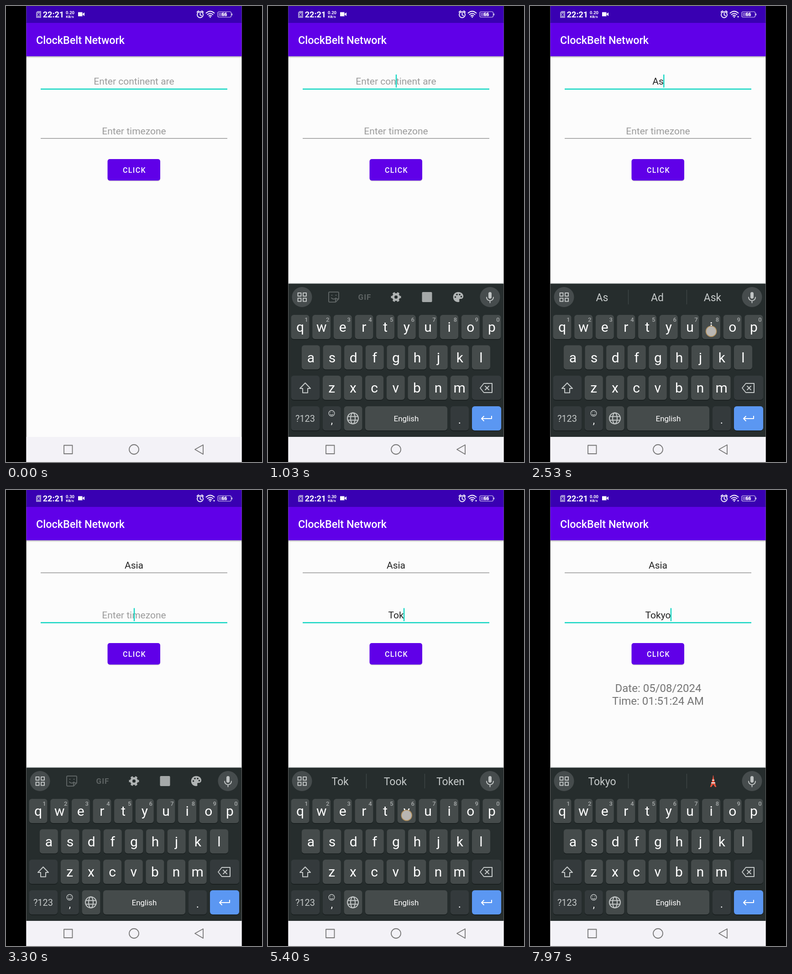
These frames come from a looping animation (561x998 px, 8000 ms). An HTML page:

```html
<!DOCTYPE html>
<html lang="en">
<head>
<meta charset="utf-8">
<title>Time lookup</title>
<style>
html, body { margin: 0; width: 100%; height: 100%; overflow: hidden; background: #000; }
svg { display: block; width: 100%; height: 100%; font-family: Roboto, "Noto Sans", sans-serif; }
text { text-anchor: middle; white-space: pre; }
.line { fill: none; stroke-linecap: round; stroke-linejoin: round; }
</style>
</head>
<body>
<svg viewBox="0 0 561 998" preserveAspectRatio="none">
  <defs>
    <clipPath id="kbClip"><rect x="44.5" y="600" width="472" height="343"/></clipPath>
    <linearGradient id="shade" x2="0" y2="1">
      <stop stop-color="#000" stop-opacity=".28"/><stop offset="1" stop-color="#000" stop-opacity="0"/>
    </linearGradient>
  </defs>
  <rect width="561" height="998"/>
  <rect x="44.5" width="472" height="998" fill="#fcfcfc"/>
  <rect x="44.5" y="110" width="472" height="4" fill="url(#shade)"/>
  <rect x="44.5" y="36" width="472" height="74" fill="#6000e8"/>
  <rect x="44.5" width="472" height="37" fill="#3900b2"/>

  <g id="status" fill="#fff" font-weight="700">
    <path d="M69 11h8v15H66V14z" fill="#a08fd6"/>
    <path d="M69 16l5 6m0-6l-5 6" stroke="#3900b2" stroke-width="1.5"/>
    <text x="104" y="25" font-size="18">22:21</text>
    <text id="speed" x="140.5" y="17.5" font-size="9.5"></text>
    <text x="140" y="25.5" font-size="8">KB/s</text>
    <path d="M158 13.5h9.500v9H158zM168 17l4-3v8l-4-3z"/>
    <g class="line" stroke="#fff" stroke-width="1.8">
      <circle cx="425.500" cy="19" r="6.500"/>
      <path d="M425.500 15v4.500l3 2M418.500 13.500l3.500-3M432.500 13.500l-3.500-3"/>
      <path d="M438.500 15.500q9-8 18 0M441.500 18.700q6-5 12 0M444.500 21.700q3-2.500 6 0"/>
      <rect x="464" y="12.500" width="29.500" height="12" rx="3" stroke="#d5caf0" stroke-width="1.2"/>
    </g>
    <circle cx="447.500" cy="24" r="1.500"/>
    <circle id="traffic" cx="456" cy="23.500" r="1.600"/>
    <rect x="466" y="14.500" width="18" height="8" rx="1" opacity=".35"/>
    <rect x="494.500" y="16.500" width="1.500" height="4"/>
    <text x="478.500" y="22.300" font-size="10.500">66</text>
  </g>

  <text x="66" y="82.500" font-size="23.400" font-weight="500" fill="#fff" style="text-anchor:start">ClockBelt Network</text>

  <rect id="line0" x="76" width="409"/>
  <rect id="line1" x="76" width="409"/>
  <text id="field0" x="280.500" y="172" font-size="21"></text>
  <text id="field1" x="280.500" y="280.500" font-size="21"></text>
  <rect id="caret" width="2.400" height="28.500" fill="#12d6c3"/>

  <rect x="223" y="337" width="115" height="46.500" rx="5" fill="#000" opacity=".18"/>
  <rect x="222.500" y="335" width="115.500" height="47" rx="5" fill="#6000e8"/>
  <rect id="ripple" x="222.500" y="335" width="115.500" height="47" rx="5" fill="#9653f0"/>
  <text x="281.500" y="365" font-size="16" font-weight="500" letter-spacing="1.400" fill="#fff">CLICK</text>

  <path id="spinner" fill="none" stroke="#0fd8c4" stroke-width="4.600"/>
  <g id="result" font-size="24" fill="#757575">
    <text x="281" y="442">Date: 05/08/2024</text>
    <text x="280.500" y="469.500">Time: 01:51:24 AM</text>
  </g>

  <g clip-path="url(#kbClip)"><g id="keyboard">
    <rect x="44.500" y="606.500" width="472" height="2" fill="#a9aeae"/>
    <rect x="44.500" y="608" width="472" height="336" fill="#262d2d"/>
    <circle cx="74.500" cy="637" r="22" fill="#464c4d"/>
    <circle cx="486.500" cy="637" r="22" fill="#464c4d"/>
    <g class="line" stroke="#c0c4c4" stroke-width="2">
      <path d="M65.500 628h7v7h-7zM77 628h7v7h-7zM65.500 639.500h7v7h-7zM77 639.500h7v7h-7z"/>
      <path d="M479 637.500a7.500 7.500 0 0 0 15 0M486.500 645.500v4"/>
      <path d="M486.500 629.500v7.500" stroke-width="7"/>
    </g>
    <g id="tools">
      <g class="line" stroke="#5d6363" stroke-width="2">
        <path d="M135 626h18q2 0 2 2v13l-7 7h-13q-2 0-2-2v-18q0-2 2-2zM155 641h-7v7M139 639q5 5 10 0M139.500 633h1M148.500 633h1" />
      </g>
      <text x="212" y="643" font-size="17" font-weight="700" letter-spacing="1" fill="#5d6363">GIF</text>
      <g fill="none" stroke="#b0b4b4">
        <circle cx="280.500" cy="637" r="6" stroke-width="5"/>
        <circle cx="280.500" cy="637" r="9" stroke-width="4" pathLength="12" stroke-dasharray="1 1" stroke-dashoffset=".5"/>
      </g>
      <rect x="337.500" y="626" width="22" height="22" rx="2" fill="#a5a9a9"/>
      <path d="M417 626c-15 0-15 22 0 22c4 0 2-4 2-5c0-2 2-2 4-2c8 0 7-15-6-15z" fill="#b0b4b4"/>
      <g fill="#262d2d"><circle cx="410.500" cy="637" r="1.800"/><circle cx="414" cy="631.500" r="1.800"/><circle cx="420" cy="631.500" r="1.800"/><circle cx="423.500" cy="636" r="1.800"/></g>
    </g>
    <g id="strip" font-size="23" fill="#c6caca">
      <path d="M215.500 621v32M343.500 621v32" stroke="#424848" stroke-width="1.200"/>
      <text id="word0" x="158" y="646"></text>
      <text id="word1" x="279" y="646"></text>
      <text id="word2" x="400" y="646"></text>
      <g id="tower">
        <path d="M401.500 625v5" stroke="#e8553f" stroke-width="1.500"/>
        <path d="M400.500 629h2l2 10 4 11h-3l-4-6-4 6h-3l4-11z" fill="#e8553f"/>
        <path d="M399 635h5M397 641h9" stroke="#f2eeee" stroke-width="2.200"/>
      </g>
    </g>
    <g id="keys"></g>
    <path id="shift" class="line" d="M81.500 825L93 837H87V846.500H76V837H70Z" stroke="#c4c8c8" stroke-width="2"/>
    <g class="line" stroke="#c4c8c8" stroke-width="2">
      <path d="M473 826h18v20h-18l-8-10zM476 832l8 8m0-8l-8 8"/>
      <circle cx="139.500" cy="891.500" r="6.300" stroke-width="1.400"/>
      <path d="M136.500 893.500q3 3.500 6 0M137 889.500h.2M142 889.500h.2" stroke-width="1.400"/>
      <circle cx="186" cy="902.500" r="12"/>
      <ellipse cx="186" cy="902.500" rx="5" ry="12"/>
      <path d="M175 898.500h22M175 906.500h22"/>
      <path d="M490 897v6h-22m5.500-5.500l-5.500 5.500 5.500 5.500" stroke="#fff" stroke-linecap="butt"/>
    </g>
    <g fill="#fff">
      <text x="81.500" y="909.500" font-size="20" fill="#c4c8c8">?123</text>
      <text x="140" y="914" font-size="22">,</text>
      <text x="303" y="908.500" font-size="17">English</text>
      <text x="420" y="914" font-size="24">.</text>
    </g>
  </g></g>

  <rect x="44.500" y="943" width="472" height="55" fill="#f3f2f7"/>
  <g class="line" stroke="#777" stroke-width="1.800">
    <rect x="127" y="961.500" width="18.500" height="18.500"/>
    <circle cx="280.500" cy="970.500" r="10.500"/>
    <path d="M414 970.500L432 960.500V981Z"/>
  </g>
  <circle id="touch" r="11.500" fill="#b9b6b2" stroke="#b3905a" stroke-width="1.600"/>
</svg>
<script>
const LOOP = 8000;
const $ = id => document.getElementById(id);
const set = (id, attrs) => { for (const k in attrs) $(id).setAttribute(k, attrs[k]); };
const label = (id, s) => { if ($(id).textContent !== s) $(id).textContent = s; };
const ramp = (t, a, b) => Math.min(1, Math.max(0, (t - a) / (b - a)));
const latest = (table, t) => table.filter(row => row[0] <= t).pop();

// Keyboard
const PITCH = 46.65;
const ROWS = [['qwertyuiop', 50.5, 676], ['asdfghjkl', 73.8, 742.5], ['zxcvbnm', 119.8, 809]];
const key = (x, y, w, fill) =>
  `<rect x="${x}" y="${y + 1.5}" width="${w}" height="53" rx="6" fill="#171d1d"/>` +
  `<rect x="${x}" y="${y}" width="${w}" height="53" rx="6" fill="${fill}"/>`;
const PLAIN = '#454b4b', DARK = '#343a3c';
let markup = key(50.5, 809, 62.5, DARK) + key(447, 809, 64, DARK) + key(50.5, 876, 62.5, DARK) +
  key(119.8, 876, 40, DARK) + key(166.5, 876, 40, PLAIN) + key(213, 876, 180, PLAIN) +
  key(400, 876, 40, DARK) + key(447, 876, 64, '#5b97f2');
const keyAt = {};
ROWS.forEach(([letters, left, top], row) => [...letters].forEach((c, i) => {
  const x = left + i * PITCH, mid = x + 20;
  keyAt[c] = [mid, top + 36];
  markup += key(x, top, 40, PLAIN) +
    `<text class="letter" data-c="${c}" x="${mid}" y="${top + 37}" font-size="30" fill="#fff">${c}</text>`;
  if (!row) markup += `<text x="${mid + 13.5}" y="${top + 14.5}" font-size="13" font-weight="500" fill="#a4a8a8">${(i + 1) % 10}</text>`;
}));
$('keys').innerHTML = markup;
const letters = [...document.querySelectorAll('.letter')];

// Typing: time, field, text, three suggestions
const TYPED = [
  [0, 0, ''],
  [2000, 0, 'A', 'A', 'I', 'And'], [2300, 0, 'As', 'As', 'Ad', 'Ask'],
  [2560, 0, 'Asi', 'Asi', 'Asia', 'Aside'], [2800, 0, 'Asia', 'Asia', 'Asian', 'Asia\u2019s'],
  [3070, 1, ''],
  [4500, 1, 'T', 'T', 'Y', 'The'], [4780, 1, 'To', 'To', 'Top', 'Too'],
  [5080, 1, 'Tok', 'Tok', 'Took', 'Token'], [5420, 1, 'Toky', 'Toky', 'Tokyo', 'Today'],
  [5800, 1, 'Tokyo', 'Tokyo', '', '']
];
const HINTS = ['Enter continent are', 'Enter timezone'];
const SPEED = [[0, '0.20'], [2620, '0.30'], [5600, '0.00']];
const CAPS = [[0, false], [1600, true], [2000, false], [4120, true], [4500, false]];

// Touches: down, up, x, y
const TOUCHES = [
  [50, 160, 282, 166], [1510, 1600, 82, 838], [2990, 3070, 284, 275],
  [4020, 4120, 82, 838], [6100, 6190, 282, 361],
  ...TYPED.filter(r => r[2]).map(([t, , text]) => {
    const [x, y] = text === 'T' ? [270, 722] : keyAt[text.slice(-1).toLowerCase()];
    return [t - 80, t + 70, x, y];
  })
].sort((a, b) => a[0] - b[0]);

// Fast-out, slow-in curve (.4, 0, .2, 1)
function ease(p) {
  let lo = 0, hi = 1;
  for (let i = 0; i < 20; i++) {
    const s = (lo + hi) / 2, x = 1.2 * s * (1 - s) ** 2 + .6 * s * s * (1 - s) + s ** 3;
    if (x < p) lo = s; else hi = s;
  }
  return 3 * lo * lo - 2 * lo ** 3;
}

function drawSpinner(t) {
  const on = t >= 6190 && t < 7500;
  set('spinner', { visibility: on ? 'visible' : 'hidden' });
  if (!on) return;
  const age = t - 6190, u = age % 1333 / 1333;
  const turn = age / 4444 * 720 + u * 90 - 106;
  const from = turn + 270 * ease(ramp(u, .5, 1)), to = turn + 270 * ease(ramp(u, 0, .5)) + 2;
  const at = deg => {
    const a = deg * Math.PI / 180;
    return `${281 + 23.5 * Math.cos(a)} ${507 + 23.5 * Math.sin(a)}`;
  };
  set('spinner', { d: `M${at(from)}A23.5 23.5 0 ${to - from > 180 ? 1 : 0} 1 ${at(to)}` });
}

function drawFields(t) {
  const [since, focus, text, ...words] = latest(TYPED, t);
  const values = focus ? ['Asia', text] : [text, ''];
  values.forEach((value, i) => {
    label('field' + i, value || HINTS[i]);
    set('field' + i, { fill: value ? '#222' : '#9b9b9b' });
    const active = i === focus;
    set('line' + i, { y: 180.6 + i * 108.5, height: active ? 2.5 : 1.3, fill: active ? '#12d6c3' : '#858585' });
  });
  const base = since || 970;
  const on = t >= base && Math.floor((t - base) / 500) % 2 === 0;
  const half = text ? $('field' + focus).getComputedTextLength() / 2 : 0;
  set('caret', { x: 279.8 + half, y: 150 + focus * 108.5, visibility: on ? 'visible' : 'hidden' });

  const typing = words.length > 0;
  const fade = since === 3070 ? ramp(t, 3100, 3280) : 1;
  set('tools', { opacity: typing ? 0 : fade });
  set('strip', { opacity: typing ? 1 : 0 });
  for (let i = 0; i < 3; i++) label('word' + i, words[i] || '');
  set('tower', { opacity: text === 'Tokyo' ? 1 : 0 });
}

function draw(t) {
  drawFields(t);
  drawSpinner(t);
  label('speed', latest(SPEED, t)[1]);
  set('traffic', { opacity: t > 1500 ? 1 : 0 });
  set('result', { opacity: t >= 7500 ? 1 : 0 });
  set('ripple', { opacity: ramp(t, 6100, 6220) * (1 - ramp(t, 6450, 6700)) });
  set('keyboard', { transform: `translate(0 ${340 * (1 - ease(ramp(t, 380, 720)))})` });

  const caps = latest(CAPS, t)[1];
  letters.forEach(el => {
    const c = caps ? el.dataset.c.toUpperCase() : el.dataset.c;
    if (el.textContent !== c) {
      el.textContent = c;
      el.setAttribute('transform', `translate(0 ${caps ? 1.5 : 0})`);
    }
  });
  $('shift').style.fill = caps ? '#c4c8c8' : 'none';

  const [down, up, x, y] = latest(TOUCHES, t) || [0, 0, 0, 0];
  set('touch', { cx: x, cy: y, opacity: up ? ramp(t, down - 1, down + 30) * (1 - ramp(t, up, up + 70)) : 0 });
}

const start = performance.now();
function tick() {
  draw((performance.now() - start) % LOOP);
  requestAnimationFrame(tick);
}
tick();
</script>
</body>
</html>
```
